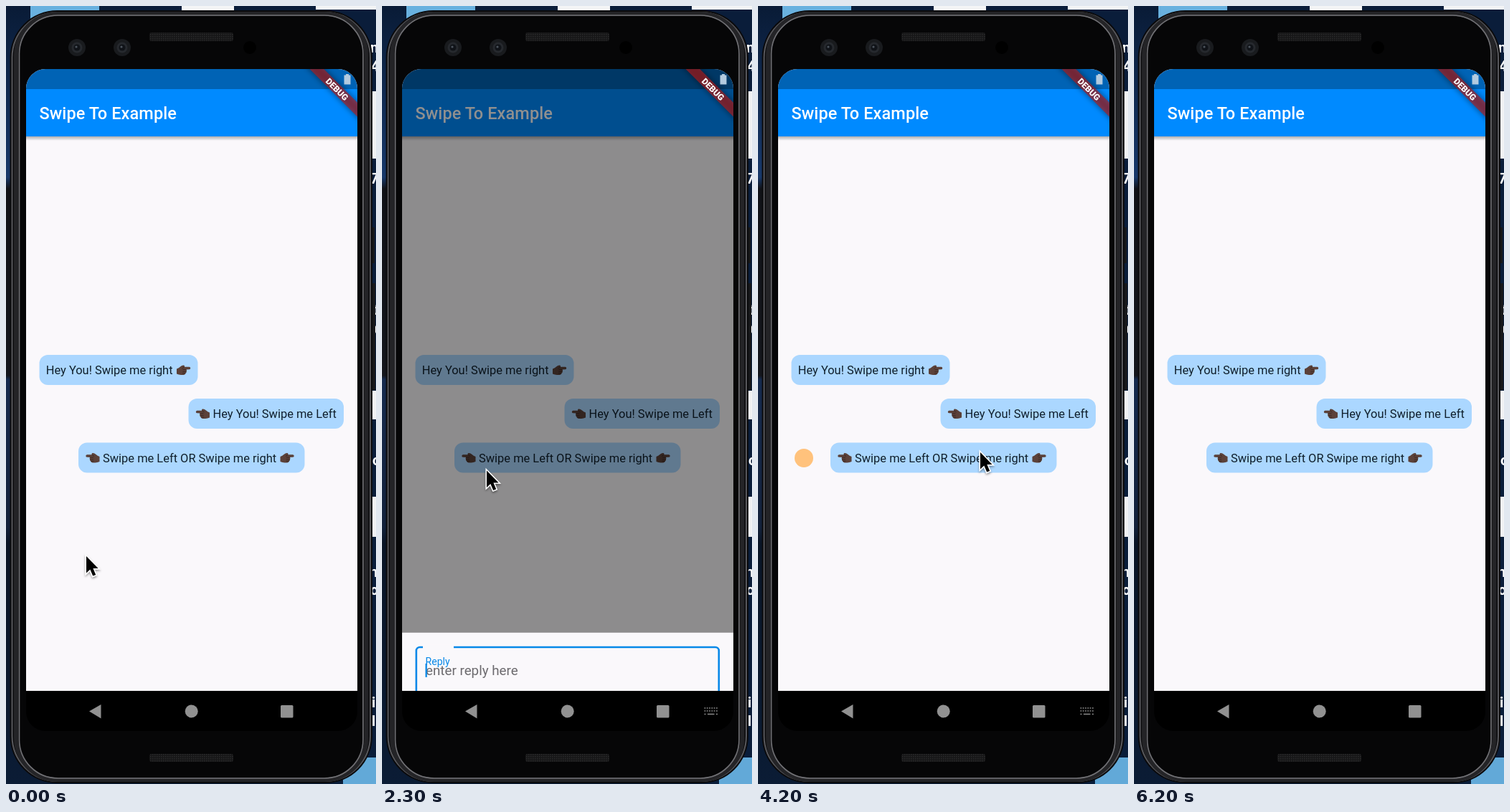
These frames come from a looping animation (516 px wide and 1086 px high, 6.3 s). An HTML page:

```html
<!DOCTYPE html>
<html lang="en">
<head>
<meta charset="utf-8">
<title>Swipe To Example</title>
<style>
  html, body { margin: 0; width: 100%; height: 100%; overflow: hidden; background: #0a1d3a; }
  svg { display: block; width: 100%; height: 100%; }
  text { font-family: Roboto, Arial, sans-serif; font-size: 16.46px; fill: #10202c; }
  .side text { font-size: 20px; font-weight: 700; fill: #fff; }
  .bubble { fill: #abd7ff; }
  .gray { fill: #919191; }
</style>
</head>
<body>
<svg viewBox="0 0 516 1086" preserveAspectRatio="none">
  <defs>
    <linearGradient id="sky" x2="0" y2="1">
      <stop offset="0" stop-color="#091b36"/><stop offset=".22" stop-color="#17386a"/>
      <stop offset=".235" stop-color="#101217"/><stop offset=".475" stop-color="#14161c"/>
      <stop offset=".48" stop-color="#152a4e"/><stop offset=".67" stop-color="#13213a"/>
      <stop offset=".69" stop-color="#091526"/><stop offset="1" stop-color="#0b1c35"/>
    </linearGradient>
    <linearGradient id="drop" x2="0" y2="1">
      <stop stop-color="#000" stop-opacity=".3"/><stop offset="1" stop-color="#000" stop-opacity="0"/>
    </linearGradient>
    <pattern id="mesh" width="3" height="3" patternUnits="userSpaceOnUse">
      <path d="M0 0H3V3H0Z" fill="#161617"/><path d="M0 0H1.5V1.5H0Z" fill="#2b2b2c"/>
    </pattern>
    <clipPath id="screen"><rect x="28" y="88" width="462" height="924" rx="27"/></clipPath>
    <clipPath id="app"><path d="M28 88H490V956H28Z"/></clipPath>
    <filter id="soft" x="-50%" y="-50%" width="200%" height="200%">
      <feDropShadow dx="0" dy="2" stdDeviation="1.5" flood-opacity=".4"/>
    </filter>
    <filter id="blur" x="-20%" y="-150%" width="140%" height="400%">
      <feGaussianBlur stdDeviation="4"/>
    </filter>
    <g id="hand">
      <path d="M0 5.5Q3 4.5 5 2.6Q7.5.3 10 .6Q11.5 1.1 10.8 2.8H17.6Q19.3 3.2 19.2 4.7Q19 6.2 17.4 6.3L13.4 6.6Q14.6 8 13.5 9.3Q14 11 12.4 11.8Q12 13.8 9.8 14H6Q3 13.8 0 12.4Z" fill="#5b4139"/>
      <path d="M13.4 6.6H8.5M13.4 9.4H8.3M12.3 11.9H8M10.8 2.8L7.5 5" fill="none" stroke="#37251f" stroke-width=".8"/>
    </g>
    <g id="lens">
      <circle r="12" fill="#191b1e"/><circle r="7.5" fill="#26292e"/>
      <circle r="4.5" fill="#101318"/><circle cx="-1" cy="-1" r="1.6" fill="#4c545d"/>
    </g>
  </defs>

  <!-- Desktop behind the phone -->
  <path d="M0 0H60V1086H0Z" fill="url(#sky)"/>
  <path d="M34 0H130V40H34Z" fill="#69b1df"/>
  <path d="M245 0H318V6H245ZM432 0H516V5H432Z" fill="#f4f5f6"/>
  <path d="M470 1049H516V1086H470Z" fill="#62a9d8"/>
  <path d="M509 119H516V213H509ZM509 537H516V577H509ZM509 685H516V741H509Z" fill="#f2f3f5"/>
  <g class="side">
    <text x="508" y="65">n</text><text x="509" y="91">4</text><text x="508" y="248">7</text>
    <text x="511" y="431">t</text><text x="509" y="457">x</text>
    <text x="511" y="641">o</text><text x="507" y="797">n</text><text x="508" y="822">o</text>
    <text x="510" y="979">i</text><text x="510" y="1005">l</text>
  </g>

  <!-- Phone body -->
  <path d="M509 309H514V359H509ZM509 387H515V536H509Z" fill="#17181a"/>
  <rect x="5.5" y="6" width="505.5" height="1079" rx="66" fill="#0a0a0c"/>
  <g fill="none">
    <rect x="8.5" y="9" width="499.5" height="1073" rx="63" stroke="#58585c" stroke-width="2"/>
    <rect x="14" y="11" width="488.5" height="1069" rx="58" stroke="#242427" stroke-width="6"/>
    <rect x="18.5" y="13" width="479.5" height="1065" rx="54" stroke="#737377" stroke-width="1.6"/>
  </g>
  <rect x="20" y="14.5" width="476.5" height="1062" rx="53" fill="#060607"/>
  <rect x="200" y="37" width="117" height="12" rx="3" fill="url(#mesh)"/>
  <rect x="200" y="1044" width="117" height="11" rx="3" fill="url(#mesh)"/>
  <use href="#lens" x="99" y="58"/><use href="#lens" x="162" y="58"/>
  <circle cx="340" cy="58" r="9" fill="#000"/>

  <g clip-path="url(#screen)">
    <path d="M28 88H490V1012H28Z"/>
    <g clip-path="url(#app)">
      <path d="M28 88H490V956H28Z" fill="#faf8fb"/>
      <path d="M28 182H490V188H28Z" fill="url(#drop)"/>
      <path d="M28 116H490V182H28Z" fill="#008aff"/>
      <path d="M28 88H490V116H28Z" fill="#0063b5"/>
      <text x="46.5" y="158" style="font-size:23.5px;font-weight:500;letter-spacing:.1px;fill:#fff">Swipe To Example</text>

      <rect class="bubble" x="46.5" y="487" width="221" height="42" rx="12"/>
      <text x="55.7" y="514">Hey You! Swipe me right</text>
      <use href="#hand" x="238" y="501"/>

      <rect class="bubble" x="254.5" y="548" width="216.5" height="42" rx="12"/>
      <text x="288.5" y="575">Hey You! Swipe me Left</text>
      <use href="#hand" transform="translate(284 562) scale(-1 1)"/>

      <circle id="leftIcon" cx="64" cy="631" r="13" fill="#ffc27c"/>
      <circle id="rightIcon" cx="454" cy="631" r="13" fill="#89929b"/>
      <g id="both">
        <rect class="bubble" x="101" y="609.5" width="315.5" height="42" rx="12"/>
        <use href="#hand" transform="translate(130.5 623.5) scale(-1 1)"/>
        <text x="135" y="636.5">Swipe me Left OR Swipe me right</text>
        <use href="#hand" x="382.5" y="623.5"/>
      </g>

      <path id="scrim" d="M28 88H490V956H28Z"/>
      <g id="sheet">
        <path d="M28 849H490V956H28Z" fill="#faf8fb"/>
        <rect x="47.8" y="869.2" width="422" height="67.2" rx="5" fill="none" stroke="#0788e8" stroke-width="2.6"/>
        <path d="M57 866H100V873H57Z" fill="#faf8fb"/>
        <text x="61" y="908" style="font-size:18.8px;fill:#6c6a6e">enter reply here</text>
        <text id="label" x="60.5" y="875" style="font-size:14.1px;fill:#0788e8">Reply</text>
        <path id="caret" d="M60.5 892H62.8V911H60.5Z" fill="#0788e8"/>
      </g>

      <path d="M474 95H478V96.5H480.5V109.5H471.5V96.5H474Z" fill="#b3cbe0"/>
      <g transform="translate(490 88) rotate(45)">
        <path d="M-60 33H60V47H-60Z" fill-opacity=".5" filter="url(#blur)"/>
        <path d="M-60 33H60V47H-60Z" fill="#b71c1c" fill-opacity=".627"/>
        <text y="44.3" text-anchor="middle" style="font-size:12px;font-weight:900;fill:#fff">DEBUG</text>
      </g>
    </g>
    <g class="gray">
      <path d="M116 984.5L132.5 975V994.5Z"/>
      <circle cx="258.7" cy="984.5" r="9"/>
      <rect x="383" y="976" width="17.5" height="17.5" rx="1.5"/>
      <g id="keys" fill="none" stroke="#8a8a8a" stroke-width="1.7">
        <path d="M449.5 980H468M449.5 984H468" stroke-dasharray="1.8 1.5"/>
        <path d="M449.5 988.5H451.5M454 988.5H463.5M466 988.5H468"/>
      </g>
    </g>
  </g>

  <path id="cursor" d="M0 0V23.5L5.3 18.6L9.2 27.6L13.2 25.9L9.4 17H16.6Z" stroke="#fff" stroke-width="3" paint-order="stroke" filter="url(#soft)"/>
</svg>
<script>
const LOOP = 6300, STEP = 100;
const $ = id => document.getElementById(id);
const clamp = x => Math.min(1, Math.max(0, x));
const ease = x => x * x * (3 - 2 * x);

// Time, x, y of the pointer tip
const path = [
  [0, 112, 768], [900, 150, 700], [1400, 235, 640], [1750, 235, 640], [2100, 141, 657],
  [2500, 151, 640], [2900, 151, 637], [3100, 138, 634], [3800, 140, 630], [4200, 310, 623],
  [4600, 300, 600], [5200, 210, 544], [5500, 200, 535], [5900, -40, 500], [LOOP, -40, 500]
];

function pointer(t) {
  const i = path.findIndex(p => p[0] > t);
  const [t0, x0, y0] = path[i - 1], [t1, x1, y1] = path[i];
  const k = ease((t - t0) / (t1 - t0));
  return [x0 + (x1 - x0) * k, y0 + (y1 - y0) * k];
}

// Out and back within 300 ms, decelerating on the way out
function swipe(t, start) {
  const x = clamp(Math.min(t - start, start + 300 - t) / 150);
  return 95 * (1 - (1 - x) ** 2);
}

const iconAlpha = (t, start) => clamp((t - start) / 80) * clamp((start + 400 - t) / 100);
const opened = (t, from, to) => ease(clamp((t - from) / 250)) * (1 - ease(clamp((t - to) / 200)));

function draw(t) {
  const LEFT = 1825, RIGHT = 3900;
  const open = opened(t, 2130, 2866) + opened(t, 4210, 5450);
  const move = (id, x, y) => $(id).setAttribute("transform", `translate(${x} ${y})`);
  const fade = (id, a) => $(id).setAttribute("opacity", a);
  const focused = t >= 2150 && t < 2850 || t >= 4200 && t < 5450;

  move("both", swipe(t, RIGHT) - swipe(t, LEFT), 0);
  fade("rightIcon", iconAlpha(t, LEFT));
  fade("leftIcon", iconAlpha(t, RIGHT));
  fade("scrim", 0.58 * open);
  move("sheet", 0, 107 * (1 - open));
  // The label sinks into the field as the sheet closes
  move("label", 0, Math.min(33, 80 * (1 - open)));
  fade("caret", focused && t % 1000 < 500 ? 1 : 0);
  fade("keys", focused ? 1 : 0);
  move("cursor", ...pointer(t));
}

const begin = performance.now();
function tick() {
  const t = (performance.now() - begin) % LOOP;
  draw(Math.floor(t / STEP) * STEP);
  requestAnimationFrame(tick);
}
tick();
</script>
</body>
</html>
```
